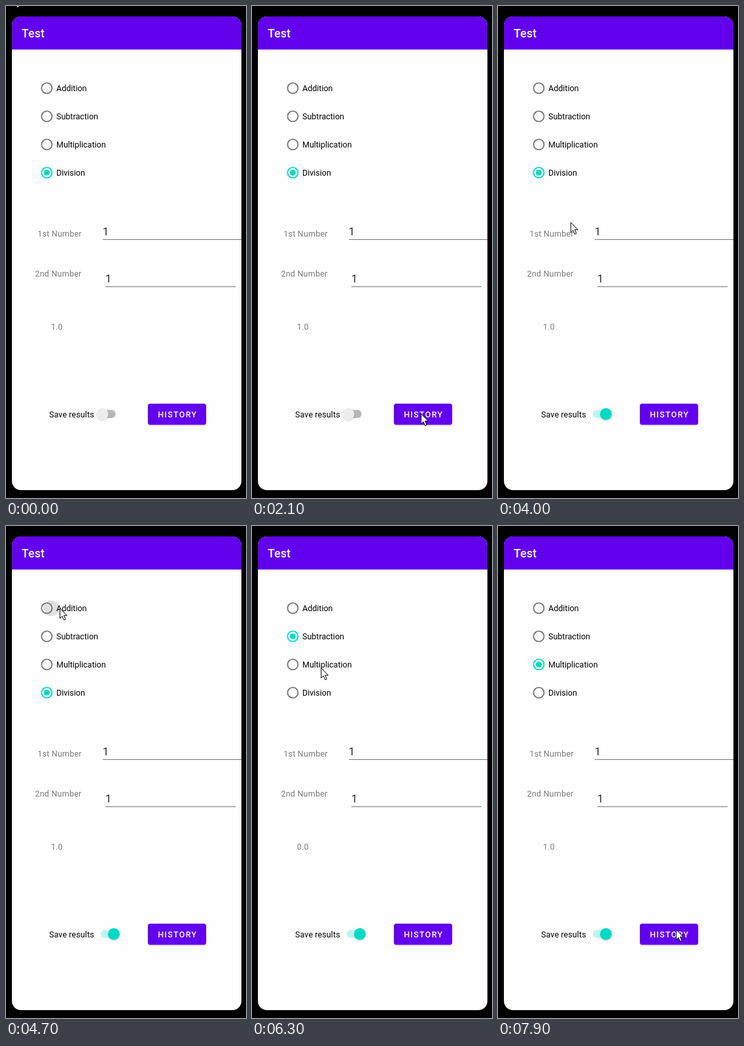
These frames come from a looping animation (367 by 751 pixels, 8 s). An HTML page:

```html
<!DOCTYPE html>
<html lang="en">
<head>
<meta charset="utf-8">
<title>Calculator demo</title>
<style>
  html, body { margin: 0; width: 100%; height: 100%; overflow: hidden; background: #000; }
  svg { display: block; width: 367px; height: 751px; font: 12.5px Roboto, "Open Sans", sans-serif; }
  .label { fill: #7a7a7a; letter-spacing: .22px; }
  .field { font-size: 16px; fill: #212121; }
  .medium { font-weight: 500; fill: #fff; }
</style>
</head>
<body>
<svg viewBox="0 0 367 751">
  <defs>
    <clipPath id="screen"><rect x="9" y="16" width="351" height="723" rx="14"/></clipPath>
    <filter id="shadow" x="-30%" y="-30%" width="160%" height="170%">
      <feDropShadow dx="0" dy="1" stdDeviation="1" flood-color="#000" flood-opacity=".2"/>
    </filter>
  </defs>
  <g clip-path="url(#screen)">
    <rect x="9" y="16" width="351" height="723" fill="#fefefe"/>
    <rect x="5" y="12" width="359" height="54.3" fill="#6200ee" filter="url(#shadow)"/>
    <text class="medium" x="24" y="48" font-size="17.9">Test</text>

    <circle id="ripple"/>
    <g id="radios"></g>

    <text class="label" x="48.3" y="352">1st Number</text>
    <text class="label" x="44.5" y="413">2nd Number</text>
    <text class="label" x="68.7" y="494" id="result"></text>
    <text class="field" x="148" y="350">1</text>
    <text class="field" x="152" y="422">1</text>
    <path d="M148 356.5H360M152 428.5H351" stroke="#757575"/>

    <text x="66" y="628" letter-spacing=".1">Save results</text>
    <rect id="track" x="145" y="616.5" width="22.5" height="12.5" rx="6.25"/>
    <circle id="switchRipple" cy="622.5"/>
    <circle id="thumb" cy="622.8" r="9" filter="url(#shadow)"/>

    <rect x="217" y="607" width="89" height="32.3" rx="3.6" fill="#6200ee" filter="url(#shadow)"/>
    <text class="medium" x="232.2" y="628" letter-spacing="1.3">HISTORY</text>
  </g>
  <path id="cursor" d="M.5 .5V16L4 12.6 6.5 18.6 9 17.5 6.5 11.7H11.2Z" fill="#fff" stroke="#000" stroke-linejoin="round"/>
</svg>
<script>
const LOOP = 8000, STEP = 100;
const TEAL = '#03dac5', GREY = '#757575';
const RADIO_X = 62.4, ROW_HEIGHT = 43;
const operations = [
  { name: 'Addition', apply: (a, b) => a + b },
  { name: 'Subtraction', apply: (a, b) => a - b },
  { name: 'Multiplication', apply: (a, b) => a * b },
  { name: 'Division', apply: (a, b) => a / b }
];
const rowY = row => 125.4 + ROW_HEIGHT * row;
const $ = id => document.getElementById(id);

// Cursor glides between resting places; times in seconds
const entry = { x: 11, y: -16 };
const glides = [
  { from: .2, to: .5, x: 271, y: 497 },
  { from: .7, to: 1.6, x: 278, y: 623 },
  { from: 1.9, to: 2.7, x: 151, y: 616 },
  { from: 3.5, to: 4.4, x: 82, y: 125 },
  { from: 5, to: 5.6, x: 88, y: 167 },
  { from: 5.7, to: 6.1, x: 104, y: 217 },
  { from: 6.2, to: 6.8, x: 121.5, y: 205.5 },
  { from: 6.9, to: 7.3, x: 275, y: 604 },
  { from: 7.5, to: 7.9, x: 272, y: 615.5 }
];
// When the first three radio rows are tapped, in order
const taps = [4.7, 5.7, 6.4];
const switchTap = 2.9;

$('radios').innerHTML = operations.map(({ name }, row) => `
  <circle class="ring" cx="${RADIO_X}" cy="${rowY(row)}" r="8" fill="none" stroke-width="1.8"/>
  <circle class="dot" cx="${RADIO_X}" cy="${rowY(row)}" r="4.5" fill="${TEAL}"/>
  <text x="77" y="${rowY(row) + 4.6}">${name}</text>`).join('');
const rings = document.querySelectorAll('.ring');
const dots = document.querySelectorAll('.dot');

const clamp = k => Math.min(1, Math.max(0, k));
const ease = k => k * k * (3 - 2 * k);
const mix = (a, b, k) => a + (b - a) * k;

function set(id, attrs) {
  for (const key in attrs) $(id).setAttribute(key, attrs[key]);
}

function drawCursor(now) {
  let { x, y } = entry;
  for (const glide of glides) {
    const k = ease(clamp((now - glide.from) / (glide.to - glide.from)));
    x = mix(x, glide.x, k);
    y = mix(y, glide.y, k);
  }
  set('cursor', { transform: `translate(${x} ${y})` });
}

function drawRadios(now) {
  const tapped = taps.filter(tap => now >= tap).length - 1;
  const age = now - taps[tapped];
  const pressed = age < .05;
  const selected = pressed ? (tapped + 3) % 4 : tapped < 0 ? 3 : tapped;

  if (age < .35) {
    const grow = clamp(age / .2);
    set('ripple', {
      cx: mix(69, RADIO_X, grow), cy: rowY(tapped), r: mix(12, 17.5, grow),
      fill: pressed ? '#000' : TEAL, opacity: pressed ? .12 : .27 - .65 * age
    });
  } else set('ripple', { r: 0 });

  operations.forEach((_, row) => {
    const on = row === selected;
    rings[row].setAttribute('stroke', on ? TEAL : GREY);
    dots[row].setAttribute('visibility', on ? 'visible' : 'hidden');
  });
  $('result').textContent = operations[selected].apply(1, 1).toFixed(1);
}

function drawSwitch(now) {
  const age = now - switchTap;
  const slide = clamp((age - .1) / .2);
  const on = slide > 0;
  const color = on ? TEAL : '#ececec';
  const x = mix(147.5, 165, slide);
  set('track', { fill: on ? '#bdf5ee' : '#b7b7b7' });
  set('thumb', { cx: x, fill: color });
  set('switchRipple', {
    cx: x, r: age >= 0 && slide < 1 ? mix(15.5, 18, slide) : 0,
    fill: on ? TEAL : '#000', opacity: on ? .2 : .12
  });
}

function draw(time) {
  const now = Math.floor(time % LOOP / STEP) * STEP / 1000;
  drawRadios(now);
  drawSwitch(now);
  drawCursor(now);
}

function tick() {
  draw(performance.now());
  requestAnimationFrame(tick);
}
tick();
</script>
</body>
</html>
```
